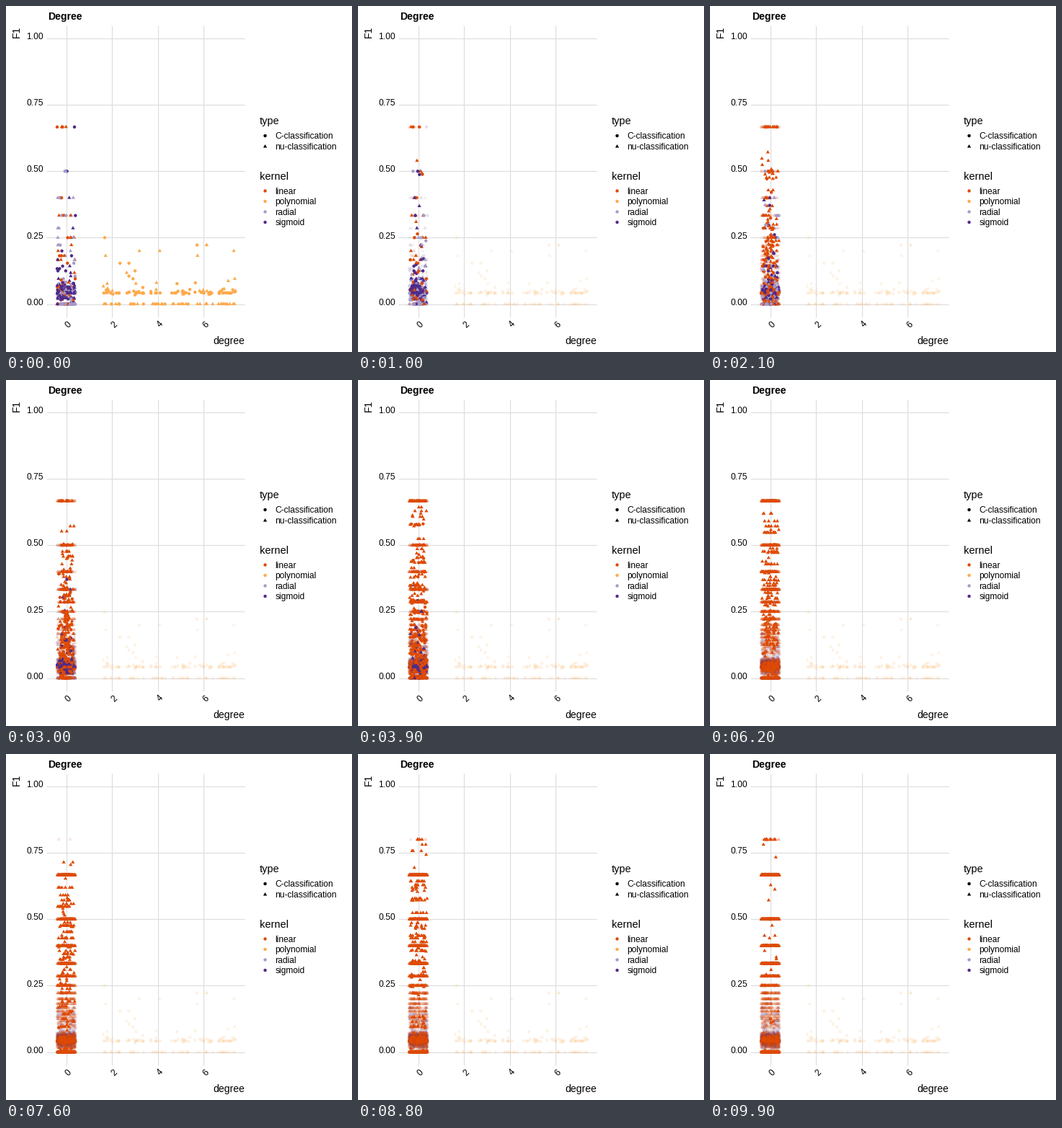
Write a matplotlib script that moves like this. It is 480x480 px and loops after 10 s.

```python
import numpy as np
import matplotlib.pyplot as plt
from matplotlib.animation import FuncAnimation
from matplotlib.collections import PathCollection
from matplotlib.colors import to_rgba
from matplotlib.path import Path
from matplotlib.transforms import Affine2D, IdentityTransform

SIZE, DPI = 480, 100
PX = 72 / DPI
FRAMES, INTERVAL = 100, 100
PERIOD, FIRST_MOVE, MOVE = 11, 5, 7
STATES = 10
LAST = STATES - 1
X0, XUNIT, Y0, YUNIT = 83.6, 31.8, 413.5, 368.5
BASE = 1 / 24

COLORS = {"linear": "#DE4A05", "polynomial": "#FDAA4B",
          "radial": "#A59BCB", "sigmoid": "#4E2A88"}
MARKS = {"o": Path.unit_circle().transformed(Affine2D().scale(2.2)),
         "^": Path([(-2.63, -1.52), (2.63, -1.52), (0, 3.02), (-2.63, -1.52)])}

plt.rcParams["font.family"] = "Liberation Sans"
rng = np.random.default_rng(12)


def to_x(degree):
    return X0 + XUNIT * degree


def to_y(score):
    return Y0 - YUNIT * score


# ---- data ----------------------------------------------------------------
def scores(n, zero, base, decay, first=1, last=20, spread=0.02, top=0.0):
    """F1 = 2 / (2 + errors), plus a band near BASE, zeros and a few at 4/5."""
    errors = first + (rng.geometric(decay, n) - 1) % (last - first + 1)
    out = 2 / (2 + errors)
    band = np.abs(BASE + 0.004 + rng.normal(0, spread, n))
    band[rng.random(n) < 0.4] = BASE
    u = rng.random(n)
    out = np.where(u < base, band, out)
    out[u > 1 - zero] = 0
    out[rng.random(n) < top] = 4 / 5
    return out


def profile(kernel, mark, k):
    """Score settings of one group in state k; None when it is absent."""
    g = k / LAST
    spread = 0.022 * (1 - g)
    if kernel == "linear" and mark == "^":
        return dict(n=30 + int(370 * (1 - np.exp(-0.45 * k))), zero=0.12,
                    base=0.05 + 0.25 * (1 - g), decay=0.12 + 0.2 * g,
                    last=max(6, int(20 - 20 * g)), spread=spread,
                    top=0.4 * max(0, g - 0.5) ** 2)
    if kernel == "linear":
        late = k > 5
        return dict(n=25 if late else 30 + 80 * k, zero=1 if late else 0.12,
                    base=0.62, decay=0.1, spread=spread)
    if kernel == "sigmoid" and k < 5:
        return dict(n=80, zero=0.04, base=0.84, decay=0.08, spread=spread)
    if kernel == "radial" and k < 3:
        return dict(n=55, zero=0.25, base=0.6, decay=0.12, first=2, spread=spread)
    if kernel == "polynomial" and k == 0:
        return dict(n=75, zero=0.45 if mark == "^" else 0.15,
                    base=0.3 if mark == "^" else 0.78,
                    decay=0.05, first=6, last=40, spread=0.005)
    return None


def next_state(prev, k):
    state = {}
    for kernel in COLORS:
        for mark in MARKS:
            p = profile(kernel, mark, k)
            if p is None:
                continue
            y = to_y(scores(**p))
            n = len(y)
            # part of the points stays on its old level
            old = prev.get((kernel, mark), np.empty((0, 2)))[:n, 1]
            keep = rng.random(len(old)) < (0.93 if k == LAST else 0.45)
            y[:len(old)] = np.where(keep, old, y[:len(old)])
            degree = rng.integers(2, 8, n) if kernel == "polynomial" else 0
            x = to_x(degree + rng.uniform(-0.4, 0.4, n))
            state[kernel, mark] = np.column_stack([x, y])
    return state


states = []
for k in range(STATES):
    states.append(next_state(states[-1] if states else {}, k))


def flatten(state, seed, alpha=1.0):
    """Paths, colours and positions of a state in a fixed mixed order."""
    paths, cols = [], []
    for (kernel, mark), pts in state.items():
        paths += [MARKS[mark]] * len(pts)
        cols += [to_rgba(COLORS[kernel], alpha)] * len(pts)
    order = np.random.default_rng(seed).permutation(len(paths))
    return [paths[i] for i in order], np.array(cols)[order], np.vstack(list(state.values()))[order]


def blend(a, b, f):
    """Only points present in both states take part in a move."""
    out = {}
    for key in a:
        if key in b:
            m = min(len(a[key]), len(b[key]))
            out[key] = a[key][:m] * (1 - f) + b[key][:m] * f
    return out


traces = [flatten(s, i, 0.15) for i, s in enumerate(states)]

# ---- static chart --------------------------------------------------------
fig = plt.figure(figsize=(SIZE / DPI, SIZE / DPI), dpi=DPI, facecolor="white")
ax = fig.add_axes([0, 0, 1, 1])
ax.set_xlim(0, SIZE)
ax.set_ylim(SIZE, 0)
ax.axis("off")


def label(x, y, s, size=12, **kw):
    kw = {"ha": "left", "va": "baseline", "color": "black", **kw}
    ax.text(x, y, s, fontsize=size * PX, **kw)


def add_marks(paths, cols, pts, z):
    col = PathCollection(paths, sizes=None, facecolors=cols, edgecolors="none",
                         offsets=pts, offset_transform=ax.transData, zorder=z)
    col.set_transform(IdentityTransform())
    ax.add_collection(col, autolim=False)
    return col


grid = dict(color="#DEDEDE", lw=1.2 * PX, zorder=0, solid_capstyle="butt")
for v in np.linspace(0, 1, 5):
    y = to_y(v)
    ax.plot([56, 331], [y, y], **grid)
    label(52, y + 1.2, f"{v:.2f}", ha="right")
for d in range(0, 8, 2):
    x = to_x(d)
    ax.plot([x, x], [27, 432], **grid)
    label(x + 3.4, 442, str(d), ha="center", va="center", rotation=45)

label(58.5, 19, "Degree", 14, weight="bold")
label(331, 469, "degree", 14, ha="right")
label(21.5, 44.5, "F1", 14, rotation=90, ha="right", va="bottom")
label(352, 164, "type", 14.5)
label(352, 241, "kernel", 14.5)

keys = [(180, "o", "black", "C-classification"), (195, "^", "black", "nu-classification")]
keys += [(256.5 + 14.5 * i, "o", c, name) for i, (name, c) in enumerate(COLORS.items())]
for y, mark, color, name in keys:
    add_marks([MARKS[mark]], [color], [(359.5, y)], 3)
    label(373.2, y + 4.3, name)

shadow = add_marks([MARKS["o"]], ["none"], [(0, 0)], 1)
live = add_marks(*flatten(states[0], 0), 2)


def put(col, paths, cols, pts):
    col.set_paths(paths)
    col.set_facecolor(cols)
    col.set_offsets(pts)


def update(i):
    k, step = divmod(max(i - FIRST_MOVE, 0), PERIOD)
    past = k + (step > 0)
    if 0 < step < MOVE:
        state = blend(states[k], states[k + 1], step / MOVE)
    else:
        state = states[past]
    put(live, *flatten(state, past))
    shadow.set_visible(past > 0)
    if past:
        paths, cols, pts = zip(*traces[:past])
        put(shadow, sum(paths, []), np.vstack(cols), np.vstack(pts))
    return shadow, live


anim = FuncAnimation(fig, update, frames=FRAMES, interval=INTERVAL, repeat=True,
                     repeat_delay=0, blit=False)
plt.show()
```
